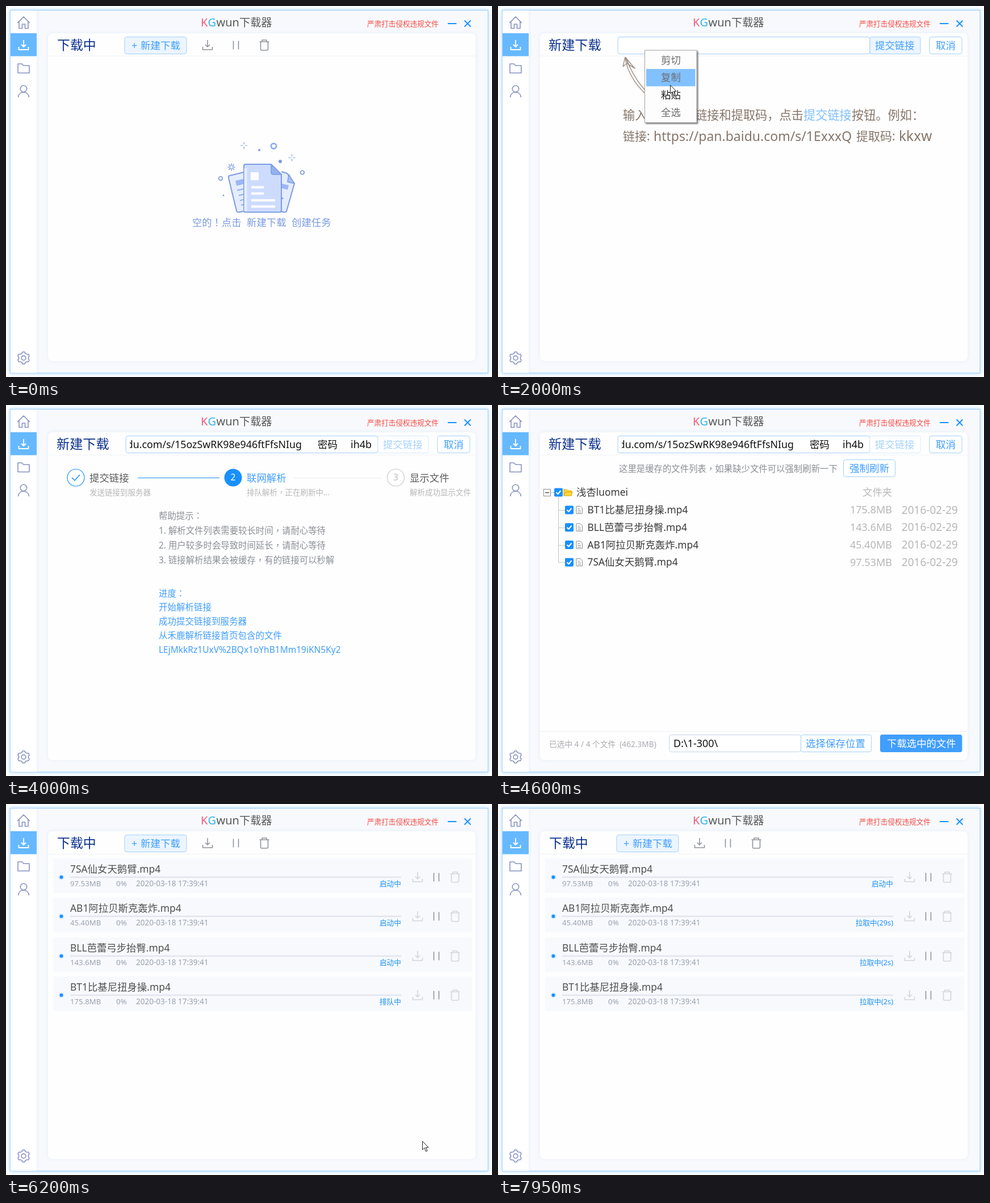
Animation of 856x654 px, one loop 8000 ms. Source, as an HTML page:

```html
<!DOCTYPE html>
<html lang="zh-CN">
<head>
<meta charset="utf-8">
<title>下载器</title>
<style>
html, body { margin: 0; width: 100%; height: 100%; overflow: hidden; background: #fff; }
svg { display: block; }
text { font-family: "Noto Sans", "Noto Sans CJK SC", "Noto Sans CJK", sans-serif; white-space: pre; }
.mid { font-family: "Noto Sans CJK TC", sans-serif; }
</style>
</head>
<body>
<svg id="stage" width="856" height="654" viewBox="0 0 856 654"></svg>
<script>
const BLUE = '#1890ff', SOFT = '#409eff', EDGE = '#a3d0fb', NAVY = '#0a2f8c', GREY = '#8b8f96', PALE = '#b7b7b9';
const LOOP = 8000;

// y is the vertical middle of the line
const text = (x, y, size, fill, str, anchor = 'start', extra = '') =>
  `<text x="${x}" y="${(y + size * 0.35).toFixed(1)}" font-size="${size}" fill="${fill}" text-anchor="${anchor}" ${extra}>${str}</text>`;
// full-width punctuation set in the middle of its cell
const mid = str => str.replace(/[，：！]/g, '<tspan class="mid" lang="zh-TW">$&</tspan>');
const box = (x, y, w, h, fill, stroke = 'none', r = 0, extra = '') =>
  `<rect x="${x}" y="${y}" width="${w}" height="${h}" rx="${r}" fill="${fill}" stroke="${stroke}" ${extra}/>`;
const line = (d, stroke, width = 1, fill = 'none') =>
  `<path d="${d}" fill="${fill}" stroke="${stroke}" stroke-width="${width}" stroke-linejoin="round"/>`;
const ring = (x, y, r, fill, stroke = 'none', width = 1) =>
  `<circle cx="${x}" cy="${y}" r="${r}" fill="${fill}" stroke="${stroke}" stroke-width="${width}"/>`;
const at = (x, y, body) => `<g transform="translate(${x} ${y})">${body}</g>`;
const group = (id, body) => `<g id="${id}">${body}</g>`;

const downloadIcon = (x, y, c, w = 1.6) => at(x, y, line('M0-9V3M-4-1L0 3L4-1M-8.5 3V8H8.5V3', c, w));
const pauseIcon = (x, y, c) => at(x, y, line('M-4.5-7.5V7.5M4.5-7.5V7.5', c, 1.6));
const trashIcon = (x, y, c) => at(x, y, line('M-8.5-6H8.5M-4-6V-9H4V-6M-6.5-6V7Q-6.5 9-4.5 9H4.5Q6.5 9 6.5 7V-6', c, 1.6));
const checkbox = (x, y) => at(x, y, box(-7.5, -7.5, 15, 15, BLUE, 'none', 2) + line('M-4 0L-1 3L4-3', '#fff', 2));
const fileIcon = (x, y) => at(x, y, line('M-5-6.5H2L5.5-3V6.5H-5ZM-2.5-2H1M-2.5 1H3M-2.5 4H3', '#8c8c8c'));

function gear(x, y) {
  let d = '';
  for (let i = 0; i < 72; i++) {
    const a = i * Math.PI / 36, r = 9.6 + 1.2 * Math.tanh(2 * Math.cos(6 * a));
    d += (i ? 'L' : 'M') + (x + r * Math.sin(a)).toFixed(1) + ' ' + (y + r * Math.cos(a)).toFixed(1);
  }
  return line(d + 'Z', '#8792c3', 1.6) + ring(x, y, 3.9, 'none', '#8792c3', 1.6);
}

function frame() {
  const ink = '#8792c3';
  return box(7.5, 7.5, 841.5, 639.5, '#f7f9fd', '#97cdfc', 0, 'filter="url(#glow)"')
    + box(8, 8, 46, 638.5, '#fff', 'none', 0, 'filter="url(#soft)"')
    + box(74, 48, 753, 578, '#fefefe', 'none', 8, 'filter="url(#soft)"')
    + line('M74 88H827', '#f0f2f7')
    + box(8, 48, 46, 40.5, '#66b9ff')
    + downloadIcon(31, 69, '#fff', 1.8)
    + line('M20 30L31 19L42 30M23 27.500V39.500H28.500V32H33.500V39.500H39V27.500', ink, 1.6)
    + line('M21 102H28L31 105H41V118H21Z', ink, 1.6)
    + ring(31, 146, 5.7, 'none', ink, 1.6) + line('M21.500 161C22 155 26 152 31 152S40 155 40.500 161', ink, 1.6)
    + gear(31, 620.5)
    + text(343, 29, 20, '#f5587b', 'K') + text(355.5, 29, 20, '#2fb5ee', 'G')
    + text(370.5, 29, 20, '#595959', 'wun') + text(411, 29, 19.2, '#595959', '下载器')
    + text(636, 32, 12.6, '#fb4a42', '严肃打击侵权违规文件')
    + line('M778 31H793.500', BLUE, 2) + line('M807.500 25.500L818.500 36.500M818.500 25.500L807.500 36.500', BLUE, 1.8);
}

function toolbar() {
  return text(90, 69, 22.9, NAVY, '下载中')
    + box(209, 54.5, 109, 30, '#ecf5ff', EDGE, 4)
    + text(221, 70, 18, SOFT, '+') + text(237, 70, 17.5, SOFT, '新建下载')
    + downloadIcon(355, 69, '#8f9399') + pauseIcon(405, 69, '#8f9399') + trashIcon(455, 69, '#8f9399');
}

function emptyArt() {
  const ink = '#7c9be2', fill = '#cddcfd';
  const spark = (x, y) => line(`M${x - 6} ${y}h4m4 0h4M${x} ${y - 6}v4m0 4v4`, ink, 1.2);
  const burst = [0, 45, 90, 135].map(a => `<path d="M-6.500 0H-2M2 0H6.500" stroke="${ink}" stroke-width="1.500" transform="rotate(${a})"/>`).join('');
  return line('M419 293L394 299Q391 300 392 303L406 361Q407 364 410 363.500L440 358', ink, 2, '#e4edfe')
    + line('M404 308L422 304V313L406 317Z', 'none', 0, '#9cb7f3')
    + line('M407 325L421 322M410 334L422 331M412 343L423 340M414 351L424 349', '#8faeef', 2)
    + line('M485 292L495 295L508 313L494 362Q493 364 490 363.500L480 361', ink, 2, '#e4edfe')
    + line('M498 297L496 310L508 313Z', ink, 1.6, '#a9c1f6')
    + line('M485 313L498 316L496 324L485 321Z', 'none', 0, '#9cb7f3')
    + line('M422 279H467L485 297V360Q485 363.500 482 363.500H422Q419 363.500 419 360V282Q419 279 422 279Z', ink, 2, fill)
    + line('M422 286V362', '#e6eeff', 5)
    + line('M467 279V293Q467 297 471 297H485Z', ink, 1.6, '#94b0ef')
    + box(431, 293, 14, 14, '#fff')
    + line('M432 319.500H454M432 330.500H454M432 342.500H474M432 353.500H474', '#fff', 4)
    + spark(419, 246) + spark(503.5, 267.5) + at(397, 284, burst)
    + ring(471.5, 247, 4.6, 'none', '#8eacee', 2.8) + ring(522, 293.5, 3.2, 'none', ink, 1.6) + ring(378, 304, 3.2, 'none', ink, 1.6)
    + ring(483, 274, 3, ink) + ring(446, 254, 2, ink) + ring(383, 334, 1.4, ink) + ring(487, 339, 1.5, ink)
    + text(328, 382, 17.3, ink, mid('空的！点击')) + text(424, 382, 17.4, ink, '新建下载') + text(503, 382, 17.4, ink, '创建任务');
}

function linkBar() {
  return text(89, 69, 23.2, NAVY, '新建下载')
    + box(211, 54.5, 444, 30, '#fff', EDGE, 4, 'id="field"')
    + box(655, 54.5, 89, 30, '#ecf5ff', EDGE, 3, 'id="submit"')
    + text(664, 70, 17.4, SOFT, '提交链接', 'start', 'id="submitLabel"')
    + box(760, 54.5, 57, 30, '#fff', EDGE, 4) + text(771, 70, 17.5, SOFT, '取消');
}

function pasted() {
  return `<g clip-path="url(#fieldClip)">${text(521, 69.5, 17.8, '#111', 'https://pan.baidu.com/s/15ozSwRK98e946ftFfsNIug', 'end')}</g>`
    + text(549, 69.5, 17.4, '#111', '密码') + text(607, 69.5, 18, '#111', 'ih4b');
}

function intro() {
  const ink = '#86766a';
  return line('M224 91C227 115 243 146 282 173M226 91C233 114 251 147 284 171M224 90L220 107M224 90L241 110L227 101L220 107M224 90L232 108', '#a1938a', 1.5)
    + text(220, 193, 21.2, ink, '输入禾鹿网盘链接和提取码，点击')
    + text(538, 193, 21.2, '#7fc0fb', '提交链接') + text(623, 193, 21.2, ink, '按钮。例如：')
    + text(220, 229.5, 21, ink, '链接:') + text(274, 229.5, 23, ink, 'https://pan.baidu.com/s/1ExxxQ')
    + text(631, 229.5, 21, ink, '提取码:') + text(706, 229.5, 24.5, ink, 'kkxw');
}

function menu() {
  const items = ['剪切', '复制', '粘贴', '全选'];
  return box(258.5, 78, 91.5, 127.5, '#fdfdfd', '#a2a2a2', 0, 'filter="url(#drop)"')
    + box(261, 111, 86.5, 30.5, '#82c1ff')
    + items.map((s, i) => text(304.5, 95.5 + i * 30.8, 17.4, i === 2 ? '#1c1c1c' : '#6d6d6d', s, 'middle')).join('');
}

function steps() {
  const help = ['帮助提示：', '1. 解析文件列表需要较长时间，请耐心等待', '2. 用户较多时会导致时间延长，请耐心等待', '3. 链接解析结果会被缓存，有的链接可以秒解'];
  const head = (x, c, title, note) => text(x, 128.5, 17.4, c, title) + text(x, 154, 13.5, PALE, mid(note));
  return ring(123, 128, 15, '#fff', BLUE, 1.2) + line('M116 128L121 133L130 123', BLUE, 1.5)
    + head(147, '#5c5c5c', '提交链接', '发送链接到服务器')
    + line('M232 128.500H376', BLUE, 1.2)
    + ring(400, 128, 15.5, BLUE) + text(400, 128, 15.5, '#fff', '2', 'middle')
    + head(424, SOFT, '联网解析', '排队解析，正在刷新中...')
    + line('M508 128.500H662', '#ebebeb')
    + ring(686.5, 128, 15, '#fff', '#c9c9c9', 1.2) + text(686.5, 128, 15.5, '#bdbdbd', '3', 'middle')
    + head(711, '#5c5c5c', '显示文件', '解析成功显示文件')
    + help.map((s, i) => text(269, 196 + i * 26, 15.4, GREY, mid(s))).join('')
    + text(269, 332.5, 15.4, SOFT, mid('进度：')) + LOG.map(([, s], i) =>
      text(269, 357 + i * 25, 15.5, SOFT, s, 'start', `id="log${i}"`)).join('');
}

const LOG = [
  [3200, '开始解析链接'], [3600, '成功提交链接到服务器'], [3600, '从禾鹿解析链接首页包含的文件'],
  [4000, 'LEjMkkRz1UxV%2BQx1oYhB1Mm19iKN5Ky2'], [4200, '成功解析链接首页'], [4200, '开始显示文件列表']
];
// each run: [first tick, seconds left]
const FILES = [
  { name: '7SA仙女天鹅臂.mp4', size: '97.53MB', runs: [[0, 29], [15, 29]] },
  { name: 'AB1阿拉贝斯克轰炸.mp4', size: '45.40MB', runs: [[0, 28], [14, 29], [30, 29]] },
  { name: 'BLL芭蕾弓步抬臀.mp4', size: '143.6MB', runs: [[0, 29], [16, 30]] },
  { name: 'BT1比基尼扭身操.mp4', size: '175.8MB', runs: [[0, 30], [16, 30]] }
];

function fileList() {
  const rows = [...FILES].reverse().map((f, i) => {
    const y = 185 + i * 30.75;
    return line(`M106.500 ${Math.round(y) + .5}H118`, '#c4c4c4') + checkbox(125.5, y) + fileIcon(143, y)
      + text(157.5, y, 17.4, '#3a3a3a', f.name)
      + text(694, y, 18, PALE, f.size, 'end') + text(810, y, 19, PALE, '2016-02-29', 'end');
  }).join('');
  return text(213, 113, 15.4, GREY, mid('这里是缓存的文件列表，如果缺少文件可以强制刷新一下'))
    + box(608.5, 96.5, 91, 30, '#fff', EDGE, 4) + text(619, 112, 17.5, SOFT, '强制刷新')
    + line('M93 154.500H99M106.500 162V277', '#c4c4c4')
    + box(80.5, 148.5, 12, 12, '#fff', '#8c8c8c') + line('M83 154.500H90', '#444', 1.4)
    + checkbox(106.5, 154) + line('M116 159V149H121L123 151H129V153H131L129 160H116Z', '#d9a300', 1, '#ffd83b')
    + line('M116 160L118.500 153.500H131', '#d9a300')
    + text(138, 154, 17.4, '#3a3a3a', '浅杏luomei') + text(642, 154, 17.4, PALE, '文件夹') + rows
    + line('M74 575.500H827', '#eef0f5')
    + text(90, 598, 13.7, '#a9abb0', '已选中 4 / 4 个文件  (462.3MB)')
    + box(301.5, 581.5, 232, 30, '#fff', '#c3d3e4', 4) + text(309, 597, 18, '#111', 'D:\\1-300\\')
    + box(533.5, 581.5, 124, 30, '#fff', EDGE, 3) + text(542, 597, 17.5, SOFT, '选择保存位置')
    + box(673, 581, 144.5, 31, SOFT, 'none', 4) + text(685, 597, 17.4, '#fff', '下载选中的文件');
}

function downloads() {
  return FILES.map((f, i) => at(0, Math.round(i * 69.3),
    box(83, 96, 738, 61, '#f7f9fd', 'none', 3)
    + line('M113 129H696', '#e2e5ec', 2.6)
    + ring(97.5, 129, 5, '#d9ecff') + ring(97.5, 129, 3, BLUE)
    + text(113, 114.5, 17.4, '#505050', f.name)
    + text(113, 140.5, 13.2, '#9aa2b1', f.size) + text(194, 140.5, 13.4, '#9aa2b1', '0%')
    + text(229, 140.5, 13.5, '#9aa2b1', '2020-03-18 17:39:41')
    + text(696, 140.5, 12.7, BLUE, '', 'end', `id="state${i}"`)
    + downloadIcon(725, 129, '#d3d5d9') + pauseIcon(758, 129, '#8f9399') + trashIcon(791, 129, '#d3d5d9'))).join('');
}

const shadow = (id, dx, blur, color, alpha) =>
  `<filter id="${id}" x="-10%" y="-10%" width="120%" height="120%"><feDropShadow dx="${dx}" dy="${dx}" stdDeviation="${blur}" flood-color="${color}" flood-opacity="${alpha}"/></filter>`;

document.getElementById('stage').innerHTML =
  `<defs>${shadow('glow', 0, 3.5, '#8ccbff', .75)}${shadow('soft', 0, 3, '#dfe6f5', .7)}${shadow('drop', 2, 1.2, '#555', .75)}
  <clipPath id="fieldClip"><rect x="218" y="55" width="430" height="29"/></clipPath></defs>`
  + frame() + group('toolbar', toolbar()) + group('empty', emptyArt()) + group('linkBar', linkBar())
  + group('pasted', pasted()) + group('intro', intro()) + group('menu', menu()) + group('steps', steps())
  + group('fileList', fileList()) + group('downloads', downloads())
  + group('cursor', line('M.500.500V15.500L4 12L6.500 18.500L9 17.500L6.300 11.300H11Z', '#222', 1, '#fff'));

const el = id => document.getElementById(id);
const SCENES = {
  toolbar: [[0, 1600], [6200, LOOP]], empty: [[0, 1600]], linkBar: [[1600, 6200]], pasted: [[2400, 6200]],
  intro: [[1600, 3200]], menu: [[2000, 2400]], steps: [[3200, 4600]], fileList: [[4600, 6200]], downloads: [[6200, LOOP]]
};
// [from, to, x, y]
const CURSOR = [[1200, 2000, 258, 77], [2000, 2400, 303, 139], [2800, 3600, 701, 74], [5800, 6350, 733, 594]];

const show = (id, on) => el(id).setAttribute('display', on ? 'inline' : 'none');
const within = (t, [from, to]) => t >= from && t < to;

function status(file, i, t) {
  if (t < 6350) return i === 3 ? '排队中' : '启动中';
  const tick = t < 6500 ? 0 : Math.floor((t - 6500) / 50) + 1;
  const [start, seconds] = file.runs.filter(r => r[0] <= tick).pop();
  const left = seconds - 2 * (tick - start);
  return left > 0 ? `拉取中(${left}s)` : '启动中';
}

function render(t) {
  for (const id in SCENES) show(id, SCENES[id].some(span => within(t, span)));
  LOG.forEach(([from], i) => show('log' + i, t >= from));
  FILES.forEach((f, i) => { el('state' + i).textContent = status(f, i, t); });
  const busy = t >= 3200;
  el('field').setAttribute('stroke', t < 2000 ? '#d5dfec' : EDGE);
  el('submit').setAttribute('fill', busy ? '#fff' : '#ecf5ff');
  el('submit').setAttribute('stroke', busy ? '#d5eaff' : EDGE);
  el('submitLabel').setAttribute('fill', busy ? '#a5d2ff' : SOFT);
  const spot = CURSOR.find(span => within(t, span));
  show('cursor', spot);
  if (spot) el('cursor').setAttribute('transform', `translate(${spot[2]} ${spot[3]})`);
}

const begin = performance.now();
function tick() {
  render((performance.now() - begin) % LOOP);
  requestAnimationFrame(tick);
}
tick();
</script>
</body>
</html>
```
